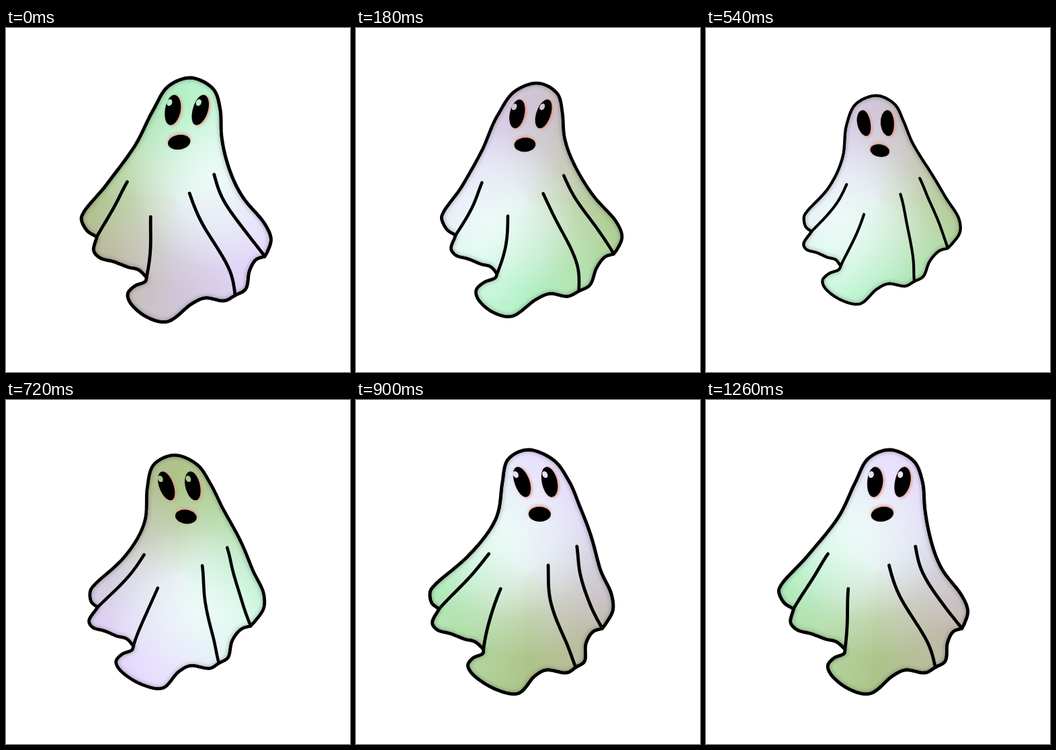
Write an HTML page with a canvas that moves like this. It is 512 px wide and 512 px high and loops after 1350 ms.

```html
<!DOCTYPE html>
<html lang="en">
<head>
<meta charset="utf-8">
<title>Floating ghost</title>
<style>
  html, body { margin: 0; height: 100%; overflow: hidden; background: #fff; }
  canvas { display: block; width: 100vw; height: 100vh; }
</style>
</head>
<body>
<canvas id="stage" width="512" height="512"></canvas>
<script>
const ctx = document.getElementById('stage').getContext('2d');
const STEP = 90, STEPS = 15, MID = 256;
const TAU = 2 * Math.PI, DEG = Math.PI / 180;
// Pastel wheel, clockwise from the top
const hues = ['#b2f0c4', '#d4faea', '#e8defe', '#e2d6fa', '#d0c6d8', '#c0baa8', '#adc489', '#b4dea9'];

// Smooth curve through key points, sampled into a polyline
function spline(points) {
  const last = points.length - 1, samples = [];
  const gap = i => Math.sqrt(Math.hypot(points[i + 1][0] - points[i][0], points[i + 1][1] - points[i][1]));
  const rate = (i, axis) => (points[i + 1][axis] - points[i][axis]) / gap(i);
  const tangent = (i, axis) => {
    if (i === 0) return rate(0, axis);
    if (i === last) return rate(i - 1, axis);
    const before = gap(i - 1), after = gap(i);
    return (rate(i - 1, axis) * after + rate(i, axis) * before) / (before + after);
  };
  for (let i = 0; i < last; i++) {
    for (let u = 0; u < 1; u += 1 / 12) {
      samples.push([0, 1].map(axis => {
        const p = points[i][axis], q = points[i + 1][axis];
        const m = tangent(i, axis) * gap(i), n = tangent(i + 1, axis) * gap(i);
        return p + u * (m + u * (3 * (q - p) - 2 * m - n + u * (2 * (p - q) + m + n)));
      }));
    }
  }
  return [...samples, points[last]];
}

function oval(x, y, rx, ry, tilt = 0) {
  const cos = Math.cos(tilt * DEG), sin = Math.sin(tilt * DEG);
  return Array.from({ length: 48 }, (_, i) => {
    const a = Math.cos(i / 48 * TAU) * rx, b = Math.sin(i / 48 * TAU) * ry;
    return [x + a * cos - b * sin, y + a * sin + b * cos];
  });
}

// The ghost at rest; lower ends of the four creases, left to right
const endA = [134, 311], endB = [198, 371], endC = [330, 398], endD = [378, 340];
const outline = [
  [endA, [122, 302], [117, 285], [122, 275], [161, 233], [196, 178], [212, 124], [229, 88],
    [263, 74], [297, 90], [312, 120], [323, 160], [341, 205], [363, 252], [388, 290],
    [393, 313], [384, 332], endD],
  [endD, [364, 345], [352, 362], [345, 389], endC],
  [endC, [315, 406], [285, 402], [266, 411], [235, 437], [202, 430], [174, 408], [170, 395],
    [180, 384], [196, 377], endB],
  [endB, [187, 360], [172, 356], [152, 348], [132, 342], [125, 332], endA]
].flatMap(spline);
const creases = [
  [[192, 229], [171, 264], endA],
  [[221, 281], [211, 325], endB],
  [[284, 246], [296, 292], [323, 362], endC],
  [[321, 218], [333, 255], [358, 304], endD]
].map(spline);
const eyes = [oval(242, 122, 11.6, 22.5, -5), oval(283, 122, 11.6, 22.5, 3)];
const glints = [oval(235, 111, 4, 5), oval(278.5, 111, 4, 5)];
const mouth = oval(262, 170, 16.5, 11);

function shadow(color, blur, x = 0, y = 0) {
  ctx.shadowColor = color;
  ctx.shadowBlur = blur;
  ctx.shadowOffsetX = x;
  ctx.shadowOffsetY = y;
}

function glow(x, y, radius, color) {
  const light = ctx.createRadialGradient(x, y, 0, x, y, radius);
  light.addColorStop(0, `rgba(${color},.8)`);
  light.addColorStop(.5, `rgba(${color},.4)`);
  light.addColorStop(1, `rgba(${color},0)`);
  return light;
}

// Pastel light that turns a quarter at a time
function paintBody(shape, turn) {
  const wheel = ctx.createConicGradient((turn - 1) * TAU / 4, MID, MID);
  [...hues, hues[0]].forEach((hue, i) => wheel.addColorStop(i / 8, hue));
  const angle = turn * TAU / 4 - 25 * DEG;
  const fills = [
    wheel,
    glow(MID, MID, 130, '222,234,230'),
    glow(MID + 65 * Math.cos(angle), MID + 65 * Math.sin(angle), 130, '240,253,250')
  ];
  ctx.save();
  ctx.clip(shape);
  for (const fill of fills) {
    ctx.fillStyle = fill;
    ctx.fillRect(0, 0, 512, 512);
  }
  shadow('rgba(50,50,50,.5)', 6);
  ctx.stroke(shape);
  ctx.restore();
  ctx.stroke(shape);
}

function draw(step) {
  const phase = step / STEPS * TAU;
  const dip = Math.sin(Math.min(step / 10, 1) * Math.PI);
  const scale = 1 - .165 * Math.max(dip, 0) ** 2.5;
  const turn = Math.round(step * 16 / STEPS) % 4;

  // A wave climbs the cloth while the whole ghost shrinks and returns
  const warp = ([x, y]) => {
    const sway = 11.5 * Math.cos(phase + (y - 73) * 1.155 * DEG);
    return [MID + (x + sway - MID) * scale, MID + (y - MID) * scale];
  };
  const trace = points => {
    const path = new Path2D();
    points.forEach(point => path.lineTo(...warp(point)));
    return path;
  };
  const fill = (points, color) => {
    ctx.fillStyle = color;
    ctx.fill(trace(points));
  };

  ctx.fillStyle = '#fff';
  ctx.fillRect(0, 0, 512, 512);
  ctx.strokeStyle = '#000';
  ctx.lineWidth = 4.8 * scale;
  ctx.lineCap = ctx.lineJoin = 'round';

  const shape = trace(outline);
  shape.closePath();
  paintBody(shape, turn);
  creases.forEach(crease => ctx.stroke(trace(crease)));

  const blush = 'rgba(240,140,115,.85)';
  shadow(blush, 4, 2, 1);
  eyes.forEach(eye => fill(eye, '#000'));
  shadow(blush, 4, 0, -2);
  fill(mouth, '#000');
  shadow('transparent', 0);
  if (scale > .9) glints.forEach(glint => fill(glint, hues[(8 - 2 * turn) % 8]));
}

function tick() {
  draw(Math.floor(performance.now() / STEP) % STEPS);
  requestAnimationFrame(tick);
}
tick();
</script>
</body>
</html>
```
